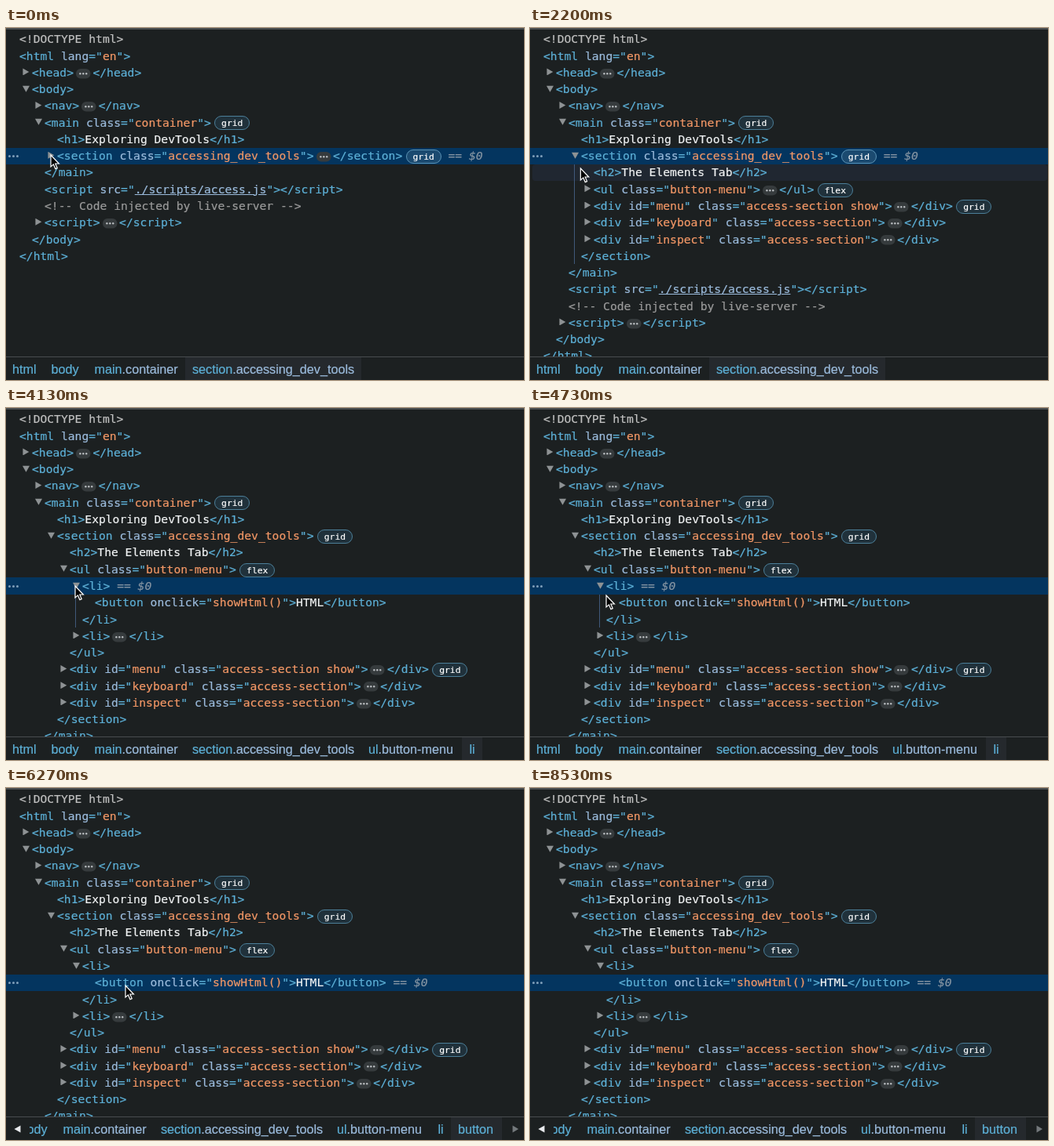
Write an HTML page that moves like this. It is 659 by 449 pixels and loops after 8.59 s.

```html
<!DOCTYPE html>
<html lang="en">
<head>
<meta charset="utf-8">
<title>Elements panel</title>
<style>
  html, body { margin: 0; width: 100%; height: 100%; overflow: hidden; background: #1c2021; }
  #stage { position: relative; width: 659px; height: 449px; overflow: hidden;
    font: 14.66px "DejaVu Sans Mono", monospace; color: #f0f2f3; -webkit-text-stroke: 0.2px; }
  #stage div { position: absolute; }
  #edge { left: 0; top: 0; width: 659px; height: 1.5px; background: #4a4e50; }
  #hover { left: 3px; width: 655px; height: 21.27px; border-radius: 4px; background: #202731; }
  .scene { inset: 0; }
  .row { white-space: pre; height: 21.27px; line-height: 21.27px; margin-top: -0.4px; }
  .picked { left: 0; width: 659px; height: 21.27px; background: #04355f; }
  .picked b { position: absolute; top: 9.4px; width: 3px; height: 3px; border-radius: 50%; background: #7f9fba; }
  .guide { width: 1px; background: #40597a; }
  .arrow { width: 9px; height: 9px; background: #8e9294; clip-path: polygon(8% 0, 96% 50%, 8% 100%); }
  .t { color: #5db0d7; }
  .a { color: #9bbbdc; }
  .v { color: #f29766; }
  .l { color: #9bbbdc; text-decoration: underline; }
  .d { color: #c0c0c0; }
  .c { color: #9a9a9a; }
  .hint { color: #8695a3; font-style: italic; }
  .pill { width: 24.5px; height: 13px; vertical-align: -2.8px; }
  .badge { display: inline-block; box-sizing: border-box; width: 45px; height: 18px; margin-left: 4.4px;
    border: 1px solid #4c7f99; border-radius: 9px; overflow: hidden; vertical-align: -4.8px;
    background: #20313b; color: #fff; font-size: 11.33px; line-height: 16px; text-align: center; }
  .on .badge { background: #1b4a70; border-color: #5b93b5; }
  #bar { left: 0; top: 419px; width: 659px; height: 30px; background: #1c2021; overflow: hidden;
    font: 16.2px/31px "Liberation Sans", Arial, sans-serif; }
  #bar .line { left: 0; top: 0; width: 659px; height: 1px; background: #484c4f; }
  .crumb { top: 1px; height: 29px; padding-left: 9.5px; box-sizing: border-box; white-space: pre; }
  .crumb.now { background: #25292d; }
  .pager { top: 1px; height: 29px; background: #1c2021; }
  .pager svg { position: absolute; top: 10px; }
  #pointer { position: absolute; left: 0; top: -0.7px; overflow: visible; }
</style>
</head>
<body>
<div id="stage">
  <div id="hover"></div>
  <div id="scenes"></div>
  <div id="edge"></div>
  <div id="bar"></div>
  <svg id="pointer" width="12" height="19">
    <path d="M0 0V15L3.4 11.9 5.9 17.6 8.2 16.6 5.8 11H10.4Z" fill="#000" stroke="#fff" stroke-width="1.2"/>
  </svg>
</div>
<script>
const LOOP = 8590, PITCH = 21.27, TOP = 3.7, INDENT = 16, CHAR_LEFT = 17, TURN = 130;
const STARTS = [0, 1760, 3065, 4000, 5950];   // when each scene begins
const NEVER = 99;

// Pointer path: time, x, y
const PATH = [
  [0, 57, 163], [1100, 57, 163], [1400, 60, 163], [1900, 60, 163], [2600, 71, 206],
  [3130, 72, 207], [3400, 72, 208], [3800, 88, 228], [4250, 88, 228], [4730, 97, 240],
  [5050, 98, 241], [5600, 138, 252], [5730, 140, 252], [5900, 152, 253], [7450, 152, 253],
  [7750, 680, 330], [LOOP, 680, 330]
];

const $ = id => document.getElementById(id);
const esc = s => s.replace(/</g, '&lt;').replace(/>/g, '&gt;');
const span = (cls, s) => `<span class="${cls}">${esc(s)}</span>`;
const pill = '<svg class="pill"><rect x="3" width="18.5" height="12.6" rx="6" fill="#363b3d"/>' +
  [8.4, 12.3, 16.2].map(x => `<circle cx="${x}" cy="6.3" r="1.2" fill="#b9bdc0"/>`).join('') + '</svg>';
const badge = s => s ? `<span class="badge">${s}</span>` : '';

// opens = index of the scene in which a node unfolds
const el = (name, attrs = {}, rest = {}) => ({ name, attrs, opens: NEVER, ...rest });
const raw = (cls, s) => ({ raw: span(cls, s) });

const button = el('button', { onclick: 'showHtml()' }, { text: 'HTML' });
const li = el('li', {}, { opens: 3, kids: [button] });
const ul = el('ul', { class: 'button-menu' }, { opens: 2, badge: 'flex', kids: [li, el('li')] });
const section = el('section', { class: 'accessing_dev_tools' }, { opens: 1, badge: 'grid', kids: [
  el('h2', {}, { text: 'The Elements Tab' }),
  ul,
  el('div', { id: 'menu', class: 'access-section show' }, { badge: 'grid' }),
  el('div', { id: 'keyboard', class: 'access-section' }),
  el('div', { id: 'inspect', class: 'access-section' })
] });
const main = el('main', { class: 'container' }, { opens: 0, badge: 'grid', kids: [
  el('h1', {}, { text: 'Exploring DevTools' }),
  section
] });
const body = el('body', {}, { opens: 0, kids: [
  el('nav'), main,
  el('script', { src: './scripts/access.js' }, { text: '' }),
  raw('c', '<!-- Code injected by live-server -->'),
  el('script')
] });
const page = el('html', { lang: 'en' }, { opens: 0, root: true, kids: [el('head'), body] });
const PICKS = [section, section, ul, li, button];

const openTag = n => span('t', '<' + n.name) +
  Object.entries(n.attrs).map(([k, v]) =>
    ' ' + span('a', k) + span('t', '="') + span(v.startsWith('./') ? 'l' : 'v', v) + span('t', '"')
  ).join('') + span('t', '>');
const closeTag = n => span('t', `</${n.name}>`);

function flatten(n, scene, depth, rows) {
  if (n.raw) { rows.push({ depth, html: n.raw }); return rows; }
  const leaf = n.text !== undefined, open = !leaf && n.opens <= scene;
  const html = leaf ? openTag(n) + esc(n.text) + closeTag(n)
    : open ? openTag(n) : openTag(n) + pill + closeTag(n);
  rows.push({ depth, node: n, html: html + badge(n.badge), arrow: !leaf && !n.root, open });
  if (open) {
    n.kids.forEach(k => flatten(k, scene, depth + 1, rows));
    rows.push({ depth, html: closeTag(n), ends: n });
  }
  return rows;
}

function add(parent, cls, style, html = '') {
  const d = document.createElement('div');
  d.className = cls;
  for (const k in style) d.style[k] = typeof style[k] === 'number' ? style[k] + 'px' : style[k];
  d.innerHTML = html;
  parent.append(d);
  return d;
}

function buildTree(scene) {
  const box = add($('scenes'), 'scene', {});
  const rows = flatten(page, scene, 0, [{ depth: 0, html: span('d', '<!DOCTYPE html>') }]);
  const pick = PICKS[scene], at = rows.findIndex(r => r.node === pick);
  const end = rows.findIndex(r => r.ends === pick);
  let turning = null;
  add(box, 'picked', { top: TOP + at * PITCH },
    [2.5, 7.5, 12.5].map(x => `<b style="left:${x}px"></b>`).join(''));
  if (end > 0) add(box, 'guide', {
    left: 8 + rows[at].depth * INDENT, top: TOP + (at + 1) * PITCH, height: (end - at) * PITCH
  });
  rows.forEach((r, i) => {
    const top = TOP + i * PITCH, left = CHAR_LEFT + r.depth * INDENT;
    if (r.arrow) {
      const a = add(box, 'arrow', { left: left - 12.3, top: top + 5.2 });
      if (r.open) a.style.transform = 'rotate(90deg)';
      if (scene && r.node.opens === scene) turning = a;
    }
    add(box, 'row' + (i === at ? ' on' : ''), { left, top },
      r.html + (i === at ? span('hint', ' == $0') : ''));
  });
  return { box, turning, at };
}

const CRUMBS = [
  ['html', '', 8], ['body', '', 57.5], ['main', '.container', 112.5],
  ['section', '.accessing_dev_tools', 237], ['ul', '.button-menu', 461],
  ['li', '', 589.5], ['button', '', 615]
];

function buildCrumbs(scene) {
  const box = add($('bar'), 'scene', {});
  const count = [4, 4, 5, 6, 7][scene], paged = count === 7, shift = paged ? -40 : 0;
  CRUMBS.slice(0, count).forEach(([name, cls, x], i) => {
    const right = CRUMBS[i + 1] ? CRUMBS[i + 1][2] : 680;
    add(box, 'crumb' + (i === count - 1 ? ' now' : ''),
      { left: x - 9.5 + shift, width: right - x }, span('t', name) + span('a', cls));
  });
  if (paged) {
    const tip = (x, d, fill) =>
      `<svg width="10" height="11" style="left:${x}px"><path d="${d}" fill="${fill}"/></svg>`;
    add(box, 'pager', { left: 0, width: 30 }, tip(10, 'M8.5 .5V9.5L.5 5Z', '#e8eaed'));
    add(box, 'pager', { left: 636, width: 23 }, tip(7.5, 'M.5 .5V9.5L8 5Z', '#74797c'));
  }
  return box;
}

const scenes = STARTS.map((_, i) => ({ ...buildTree(i), bar: buildCrumbs(i) }));
add($('bar'), 'line', {});

function pointerAt(t) {
  const i = Math.max(1, PATH.findIndex(p => p[0] > t));
  const [t0, x0, y0] = PATH[i - 1], [t1, x1, y1] = PATH[i];
  const u = (t - t0) / (t1 - t0), e = u * u * (3 - 2 * u);
  return [x0 + (x1 - x0) * e, y0 + (y1 - y0) * e];
}

function draw(t) {
  const now = STARTS.filter(s => s <= t).length - 1;
  scenes.forEach((s, i) => {
    s.box.style.display = s.bar.style.display = i === now ? '' : 'none';
  });
  const { turning, at } = scenes[now];
  if (turning) {
    const u = Math.min(1, (t - STARTS[now]) / TURN);
    turning.style.transform = `rotate(${90 * u}deg)`;
  }
  const [x, y] = pointerAt(t);
  $('pointer').style.transform = `translate(${x}px, ${y}px)`;
  const row = Math.floor((y - 3 - TOP) / PITCH);
  $('hover').style.top = TOP + row * PITCH + 'px';
  $('hover').style.display = x < 659 && row !== at ? '' : 'none';
}

function tick() {
  draw(performance.now() % LOOP);
  requestAnimationFrame(tick);
}
tick();
</script>
</body>
</html>
```
